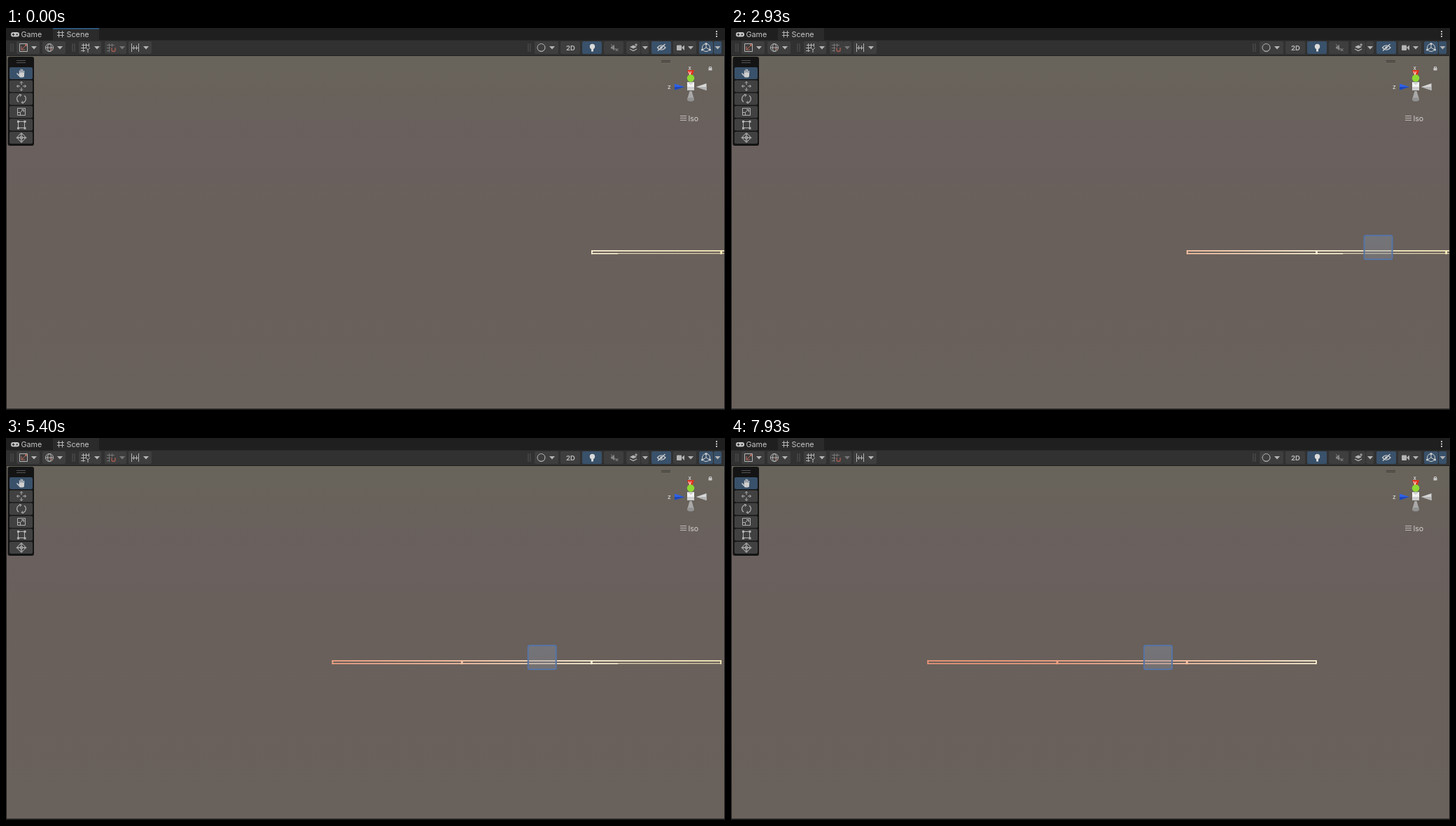
An HTML page with a canvas that plays this animation: 1027x545 px, repeating every 8000 ms.

```html
<!DOCTYPE html>
<html lang="en">
<head>
<meta charset="utf-8">
<title>Scene view</title>
<style>
html, body { margin: 0; width: 100%; height: 100%; overflow: hidden; background: #1a1a1a; }
canvas { display: block; }
</style>
</head>
<body>
<canvas id="stage" width="1027" height="545"></canvas>
<script>
const W = 1027, H = 545, LOOP = 8000, STEP = 1000 / 15;
const ICON = '#b4b4b4', BUTTON = '#3e3e3e', ACTIVE = '#39516a';
const screen = document.getElementById('stage').getContext('2d');
const backdrop = document.createElement('canvas');
backdrop.width = W;
backdrop.height = H;
let g = backdrop.getContext('2d');

function rect(x, y, w, h, color) {
  g.fillStyle = color;
  g.fillRect(x, y, w, h);
}

function round(x, y, w, h, r, color) {
  g.fillStyle = color;
  g.beginPath();
  g.roundRect(x, y, w, h, r);
  g.fill();
}

function poly(color, ...p) {
  g.fillStyle = color;
  g.beginPath();
  for (let i = 0; i < p.length; i += 2) g.lineTo(p[i], p[i + 1]);
  g.fill();
}

function path(d, color = ICON, width = 1) {
  g.strokeStyle = color;
  g.lineWidth = width;
  g.stroke(new Path2D(d));
}

function disc(x, y, r, color) {
  g.fillStyle = color;
  g.beginPath();
  g.arc(x, y, r, 0, 7);
  g.fill();
}

function ring(x, y, rx, ry = rx, color = ICON) {
  g.strokeStyle = color;
  g.lineWidth = 1;
  g.beginPath();
  g.ellipse(x, y, rx, ry, 0, 0, 7);
  g.stroke();
}

function label(text, x, y, size, color = '#c4c4c4', weight = 400) {
  g.font = `${weight} ${size}px Inter, "Liberation Sans", sans-serif`;
  g.textBaseline = 'alphabetic';
  g.fillStyle = color;
  g.fillText(text, x, y);
}

const arrow = (x, color = ICON) => poly(color, x - 4, 26, x + 4, 26, x, 30.5);

function drawTabs() {
  rect(0, 0, W, 18, '#1f1f1f');
  rect(67, 0, 66, 18, '#2b2b2b');
  round(7, 6, 12, 6.5, 3, '#c4c4c4');
  path('M8.5 9.3h4M10.5 7.5v3.6', '#1f1f1f');
  disc(15.7, 9.3, 1.1, '#1f1f1f');
  label('Game', 21.5, 13, 10.8);
  path('M73 6.5h10M73 10.5h10M75.5 4v9.5M80.5 4v9.5');
  label('Scene', 86.5, 13, 10.8);
  for (const y of [4, 7.5, 11]) rect(1014, y, 2, 2, '#c4c4c4');
}

function drawToolbar() {
  rect(0, 17.5, W, 21.5, '#313131');
  for (const x of [7, 10, 95, 98, 746, 749]) rect(x - .5, 22, 1, 12, '#555');
  const buttons = [
    [15, 33], [52, 33], [104, 20], [124, 12], [141, 20], [161, 11], [175, 33],
    [755, 34], [792, 28], [823, 28, 1], [854, 28], [886, 20], [907, 11],
    [922, 28, 1], [953, 33], [990, 20, 1], [1011, 11, 1]
  ];
  for (const [x, w, on] of buttons) round(x, 19, w, 18, 2, on ? ACTIVE : BUTTON);
  for (const x of [40, 77, 130, 200, 780, 913, 978]) arrow(x);
  arrow(166, '#777');
  arrow(1016.5);

  path('M19.5 22.5h11v11h-11z');
  path('M22 31l6-6M22 26v5h5', '#b8685a');
  disc(28.5, 24.5, 1.5, '#b8685a');

  ring(62, 28, 5.5);
  ring(62, 28, 2.5, 5.5);
  path('M56.5 28h11');
  path('M62 28l5 4', '#b8685a');

  path('M108 24.5h11M107 28.5h7M107 32.5h6M110.5 22v12M114.5 22v6M118.5 22v5');
  path('M114 28l3 3 3-3M117 31v4');

  path('M144 24.5h11M144 28.5h5M144 32.5h4M147.5 22v12M151.5 22v5', '#777');
  path('M151 28v3a2.5 2.5 0 0 0 5 0v-3', '#9b5a50', 1.5);

  path('M179.5 22v12M189.5 22v12M182.5 25v6M186.5 25v6M179 28.5h11');

  ring(764.5, 28, 5.5);
  g.save();
  g.beginPath();
  g.arc(764.5, 28, 5.5, 0, 7);
  g.clip();
  path('M769 23a6 6 0 0 1-9 9', ICON, 2);
  g.restore();

  label('2D', 800, 31.5, 9.5, ICON, 700);

  disc(837.5, 26.5, 3.7, '#dadada');
  rect(836, 29, 3, 4.5, '#dadada');

  poly('#858585', 864, 26.5, 866, 26.5, 869, 23.5, 869, 32.5, 866, 29.5, 864, 29.5);
  path('M871 29l3.5 4M874.5 29l-3.5 4M864 23l8 9', '#858585');

  poly(ICON, 891, 27, 896, 24.5, 901, 27, 896, 29.5);
  path('M891 30l5 2.5 5-2.5', ICON, 1.3);
  path('M898 24h4M900 22v4');

  path('M930.5 28q5.500-6.500 11.500 0q-6 6.500-11.500 0z', '#d0d0d0', 1.2);
  disc(936, 28, 1.8, '#d0d0d0');
  path('M931 32.500l10.500-9.500', '#d0d0d0', 1.3);

  round(958, 24.5, 7, 7.5, 1, ICON);
  poly(ICON, 965, 28, 969, 24.5, 969, 32);

  ring(1000, 28, 5.5, 5.5, '#d0d0d0');
  path('M1000 22v6l-6 3.500M1000 28l6 3.500', '#d0d0d0');
  for (const [x, y] of [[1000, 22.5], [994.5, 31], [1005.5, 31]]) disc(x, y, 1.6, '#d0d0d0');
}

function drawView() {
  rect(0, 39, W, H - 39, '#202020');
  const sky = g.createLinearGradient(0, 40, 0, 543);
  sky.addColorStop(0, '#69645b');
  sky.addColorStop(.1, '#68625b');
  sky.addColorStop(.25, '#6a605e');
  sky.addColorStop(.45, '#69605b');
  sky.addColorStop(1, '#69615b');
  rect(1, 40, 1025, 503, sky);
}

function drawTools() {
  round(2.5, 41, 37.5, 127, 3, '#141414');
  path('M15 46.500h13M15 49.500h13', '#555');
  for (let i = 0; i < 6; i++) round(5, 56 + i * 18.4, 33, 17, 2, i ? '#414141' : ACTIVE);

  // hand
  round(18.5, 63.5, 7.5, 7, 2.5, '#cfcfcf');
  path('M19.500 66v-5.500M21.500 65v-6.500M23.500 65v-6M25.500 66v-5M18.500 68l-3-3.500', '#cfcfcf', 1.3);
  // move
  path('M15.500 83h4.500M24 83h4.500M22 76.500v4.500M22 85v4.500');
  path('M17.500 81l-2 2 2 2M26.500 81l2 2-2 2M20 78.500l2-2 2 2M20 87.500l2 2 2-2');
  // rotate
  path('M18 105.500a5.500 5.500 0 0 1 3-10M26 96.500a5.500 5.500 0 0 1-3 10', ICON, 1.2);
  path('M19 94.500l3 1-2 2.500M25 107.500l-3-1 2-2.500');
  // scale
  path('M16.500 114.500h11v10h-11zM16.500 120.500h4v4M21 120l4-3.500M22 116.500h3.500v3.500');
  // rect transform
  path('M17.500 133.500h9v9h-9z');
  for (const x of [16, 25.5]) for (const y of [132, 141.5]) rect(x, y, 3, 3, ICON);
  // combined
  ring(22, 156.3, 5);
  path('M15.500 156.500h13M22 150v13');
  path('M20 151.500l2-2 2 2M20 161.500l2 2 2-2M17 154.500l-2 2 2 2M27 154.500l2 2-2 2');
  ring(22, 156.3, 2.2);
}

function drawGizmo() {
  path('M936 46.500h13M936 48.500h13', '#3f3c39');
  poly('#e0331c', 973, 60, 983, 60, 979.5, 70, 976.5, 70);
  label('x', 974.5, 59.5, 8, '#eee');
  label('y', 974.5, 66.5, 8, '#fff', 600);
  disc(978, 71.5, 5.2, '#8ed834');
  rect(973, 77, 10, 12, '#cfcfcf');
  poly('#f2f2f2', 973, 77, 978, 81, 983, 77, 983, 84, 973, 84);
  poly('#2f62e8', 955, 79.5, 969, 84, 955, 88.5);
  poly('#1f47b8', 955, 84, 969, 84, 955, 88.5);
  poly('#d8d8d8', 986, 84, 1000.5, 79, 1000.5, 89);
  poly('#b5b5b5', 986, 84, 1000.5, 84, 1000.5, 89);
  poly('#a9a9a9', 976.5, 90, 979.5, 90, 983, 102, 973, 102);
  g.fillStyle = '#929292';
  g.beginPath();
  g.ellipse(978, 102, 5, 2.8, 0, 0, 7);
  g.fill();
  label('z', 945, 86.5, 8.5, '#e6e6e6');
  rect(1003.5, 57, 5, 3.5, '#c8c8c8');
  path('M1004.500 57v-1.500h3v1.500', '#c8c8c8');
  path('M963 125.500h9M963 128.500h9M963 131.500h9', '#c0bebb');
  label('Iso', 974.5, 132.5, 10.5, '#d6d4d1');
}

// Left edge of the cube over time
const keys = [[1330, 1024], [2200, 953], [3000, 899], [3667, 852.8], [4800, 781.8],
  [6067, 703.6], [6867, 653.6], [7330, 627], [7933, 589]];

function cubeX(t) {
  if (t < keys[0][0]) return W + 50;
  let i = 1;
  while (i < keys.length - 1 && t > keys[i][0]) i++;
  const [t0, x0] = keys[i - 1], [t1, x1] = keys[i];
  return x0 + (x1 - x0) * (t - t0) / (t1 - t0);
}

const TILE = 185.2, FIRST = 836;

function drawTiles(cube) {
  // A new tile joins in front whenever the cube crosses a joint
  const passed = [0, 1, 2].filter(i => cube + 21 <= 1021 - i * TILE).length;
  const glow = g.createLinearGradient(280, 0, 1027, 0);
  glow.addColorStop(0, '#ee9577');
  glow.addColorStop(.25, '#f5a284');
  glow.addColorStop(.5, '#fcc5a6');
  glow.addColorStop(.73, '#fff2d4');
  glow.addColorStop(1, '#f7eab8');
  for (let i = 0; i < 3; i++) {
    const x = FIRST + (i - passed) * TILE, end = x + TILE;
    const thick = x >= FIRST - 1 ? Math.max(x, Math.min(end, 874.5)) : end;
    rect(x, 317, TILE, 1.8, glow);
    rect(x, 321, thick - x, 1.6, glow);
    rect(thick, 321.2, end - thick, 1, glow);
    rect(x, 317, 1.8, 5.6, glow);
    rect(end - 1, 317, 1.8, 5.6, glow);
  }
}

function drawCube(x) {
  const shade = g.createLinearGradient(0, 295, 0, 331);
  shade.addColorStop(0, 'rgba(130,145,165,.42)');
  shade.addColorStop(1, 'rgba(135,140,155,.36)');
  round(x + 1, 296, 40, 34, 2, shade);
  g.strokeStyle = '#5674a5';
  g.lineWidth = 2;
  g.beginPath();
  g.roundRect(x + 1, 296, 40, 34, 2.5);
  g.stroke();
}

drawTabs();
drawToolbar();
drawView();
drawTools();
drawGizmo();
g = screen;

function draw(now) {
  const t = Math.floor((now % LOOP + 3.5) / STEP) * STEP;
  g.drawImage(backdrop, 0, 0);
  if (t < 465) rect(67, 0, 66, 1.6, '#2c5d87');
  g.save();
  g.beginPath();
  g.rect(1, 40, 1025, 503);
  g.clip();
  const x = cubeX(t);
  drawTiles(x);
  drawCube(x);
  g.restore();
}

const start = performance.now();
function tick() {
  draw(performance.now() - start);
  requestAnimationFrame(tick);
}
tick();
</script>
</body>
</html>
```
